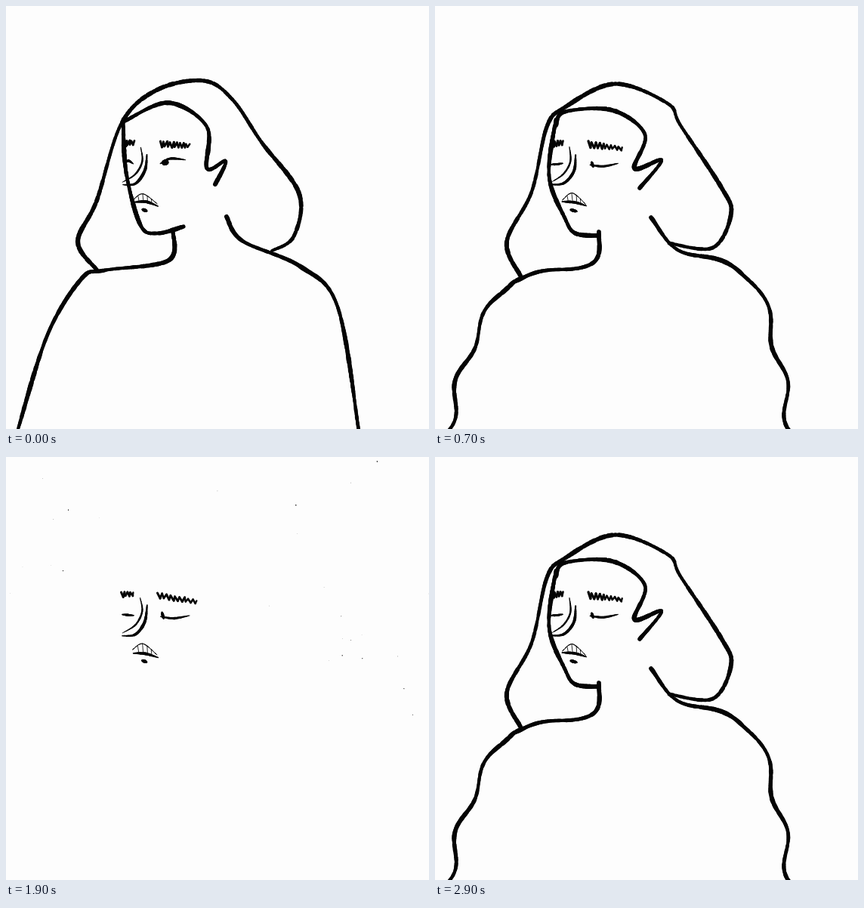
Write an HTML page with a canvas that moves like this. It is 560x560 px and loops after 3.1 s.

```html
<!DOCTYPE html>
<html lang="en">
<head>
<meta charset="utf-8">
<title>Dissolving portrait</title>
<style>
html, body { margin: 0; width: 100%; height: 100%; overflow: hidden; background: #fdfdfd; }
canvas { display: block; }
</style>
</head>
<body>
<canvas id="stage" width="560" height="560"></canvas>
<script>
const ctx = document.getElementById('stage').getContext('2d');
const STEP = 100, LOOP = 3100, LAST = 29, TURN = 18;
const CLOSE = 7, DASHES = 11, DOTS = 13, SCATTER = 15;
const INK = '#050505', PAPER = '#fdfdfd', MIDDLE = 230;

const pts = s => s.split(' ').map(p => p.split(',').map(Number));
const mix = (a, b, k) => a + (b - a) * k;
const mixPt = (p, q, k) => [mix(p[0], q[0], k), mix(p[1], q[1], k)];
const mixPath = (a, b, k) => a.map((p, i) => mixPt(p, b[i], k));
const clamp = v => Math.max(0, Math.min(1, v));
const rnd = n => { const v = Math.sin(n * 127.1 + 11.7) * 43758.5453; return v - Math.floor(v); };
const spread = (n, size) => (rnd(n) * 2 - 1) * size;
const times = (n, make) => Array.from({ length: n }, (_, i) => make(i));

// Catmull-Rom curve through the points, sampled evenly by length.
function curve(p, n = 140) {
  const dense = [], len = [0];
  for (let i = 0; i < p.length - 1; i++) {
    const a = p[Math.max(0, i - 1)], b = p[i], c = p[i + 1], d = p[Math.min(p.length - 1, i + 2)];
    for (let j = i ? 1 : 0; j <= 12; j++) {
      const t = j / 12;
      dense.push([0, 1].map(k => b[k] + t / 2 * (c[k] - a[k] +
        t * (2 * a[k] - 5 * b[k] + 4 * c[k] - d[k] + t * (3 * (b[k] - c[k]) + d[k] - a[k])))));
    }
  }
  for (let i = 1; i < dense.length; i++)
    len.push(len[i - 1] + Math.hypot(dense[i][0] - dense[i - 1][0], dense[i][1] - dense[i - 1][1]));
  const total = len[len.length - 1];
  let j = 0;
  return times(n, i => {
    const s = total * i / (n - 1);
    while (j < dense.length - 2 && len[j + 1] < s) j++;
    return mixPt(dense[j], dense[j + 1], (s - len[j]) / (len[j + 1] - len[j] || 1));
  });
}

function pointAt(path, u) {
  const x = clamp(u) * (path.length - 1), i = Math.min(path.length - 2, Math.floor(x));
  return mixPt(path[i], path[i + 1], x - i);
}
const section = (path, u0, u1, n = 40) => times(n, i => pointAt(path, mix(u0, u1, i / (n - 1))));
const lengthOf = path => path.slice(1).reduce((sum, p, i) => sum + Math.hypot(p[0] - path[i][0], p[1] - path[i][1]), 0);

// Ripples a shoulder line along its normal, stronger towards the hem.
function ripple(path, side) {
  return path.map((p, i) => {
    const a = path[Math.max(0, i - 1)], b = path[Math.min(path.length - 1, i + 1)];
    const dx = b[0] - a[0], dy = b[1] - a[1], u = i / (path.length - 1);
    const push = side * 8 * u * Math.cos((u - .55) / .27 * Math.PI * 2) / Math.hypot(dx, dy);
    return [p[0] + dy * push, p[1] - dx * push];
  });
}

// Each pose: hair, ear with hairline, face, left shoulder, right shoulder.
const pose = (...lines) => lines.map(s => curve(pts(s)));
const first = pose(
  '120,349 95,312 120,258 153,155 200,111 262,99 300,124 338,180 388,248 381,305 352,324',
  '277,236 291,205 266,215 266,160 215,128 156,153',
  '155,150 159,220 178,290 200,301 235,292',
  '221,297 215,337 130,350 100,361 55,435 16,560',
  '292,279 313,311 390,345 439,398 467,562');
const second = pose(
  '118,352 94,325 120,262 160,145 178,130 240,100 308,128 360,203 398,270 370,322 322,322',
  '279,241 297,200 269,215 270,160 205,130 160,158',
  '158,150 158,235 175,287 192,300 231,294',
  '217,299 208,340 120,357 92,374 52,440 15,560',
  '286,280 322,322 405,350 441,410 473,562');
const closed = [...pose(
  '113,357 95,312 128,246 148,160 172,134 238,103 308,129 325,158 379,240 392,275 368,320 310,314',
  '271,241 300,204 264,215 278,170 235,138 172,140 160,158',
  '160,150 151,225 172,281 186,301 217,304'),
  ripple(second[3], -1), ripple(second[4], 1)];

// Where along each line a dash survives; the line breaks halfway between them.
const survivors = [[.05, .26, .4, .59, .71, .82], [.12], [.13, .55], [.05, .5, .66, .88], [.41, .64, .95]];
const outward = ([x, y], k) => [x + (x - MIDDLE) * .12 * k, y - 8 * k];
const pieces = survivors.flatMap((spots, n) => spots.map((spot, i) => {
  const path = closed[n], total = lengthOf(path);
  const u0 = i ? (spots[i - 1] + spot) / 2 : 0;
  const u1 = i < spots.length - 1 ? (spot + spots[i + 1]) / 2 : 1;
  const half = Math.min(25 / total, (u1 - u0) * .2);
  return k => section(path, mix(u0, spot - half, k), mix(u1, spot + half, k)).map(p => outward(p, k));
}));

// A dash crumbles into four dots that drift up and away from the middle.
const crumbs = pieces.flatMap((shape, n) => times(4, i => {
  const u = .05 + .3 * i, seed = n * 4 + i, dash = shape(1), [x, y] = pointAt(dash, u);
  const drift = [Math.sign(x - MIDDLE) * 14 + spread(seed, 4), -8 - y * y / 6000 + spread(seed + 99, 4)];
  return { bit: section(dash, u - .1, u + .1, 6), drift, dot: [x + drift[0], y + drift[1]] };
}));

// Specks fan out in an arc around the head, each leaving from a dot in the same direction.
const angle = p => Math.atan2(p[0] - 250, 340 - p[1]);
const origins = crumbs.map(c => c.dot).sort((a, b) => angle(a) - angle(b));
const specks = times(84, i => {
  const turn = mix(-1.6, 1.85, (i + rnd(i)) / 84), reach = mix(205, 410, rnd(i + 200));
  return {
    from: origins[Math.floor(i * origins.length / 84)],
    to: [250 + Math.sin(turn) * reach, 340 - Math.cos(turn) * reach],
    r: .6 + 1.8 * rnd(i + 400) ** 3
  };
});

function brush(path, width, seed = 0) {
  for (let i = 1; i < path.length; i++) {
    ctx.lineWidth = width(i / (path.length - 1)) * (.88 + .24 * rnd(i + seed));
    ctx.beginPath();
    ctx.moveTo(...path[i - 1]);
    ctx.lineTo(...path[i]);
    ctx.stroke();
  }
}

function speck([x, y], r, seed) {
  ctx.beginPath();
  ctx.ellipse(x, y, r * 1.15, r * .9, rnd(seed) * Math.PI, 0, Math.PI * 2);
  ctx.fill();
}

function scribble(a, b, teeth, seed) {
  const zigzag = times(teeth + 1, i => {
    const [x, y] = mixPt(a, b, i / teeth);
    return [x + spread(i + seed, 1), y + (i % 2 ? 1 : -1) * (4 - 1.6 * i / teeth) * (.6 + .5 * rnd(i + seed))];
  });
  brush(zigzag, u => 3 - .5 * u, seed);
}

const features = [
  ['178,187 180,205 171,223 155,233', 2.4],
  ['187,197 184,218 171,234 154,237', 4],
  ['169,260 185,260 201,265', 3.6],
  ['180,270 187,271', 4.2]
];
const openEyes = [['157,209 162,205 168,209', 3], ['205,209 217,202 238,203', 3], ['209,208 214,207', 7]];
const closedEyes = [['153,209 161,210 169,209', 3], ['205,211 222,213 242,209', 3], ['207,206 209,214', 3.6]];

function drawFace(f) {
  const drift = clamp(f / DOTS);
  const shaky = (s, seed) => curve(pts(s).map(([x, y], i) =>
    [x + spread(seed + i, 1), y + spread(seed + i + 50, 1)]), 24);
  scribble([mix(157, 153, drift), 182], [169, 181], 8, f);
  scribble([mix(204, 201, drift), 183], [mix(243, 253, drift), mix(185, 192, drift)], 18, f);
  [...features, ...(f < CLOSE ? openEyes : closedEyes)].forEach(([s, width], i) =>
    brush(shaky(s, f * 9 + i * 5), u => width * (.4 + .6 * Math.sin(Math.PI * u)), f));
  const upper = shaky('168,256 181,248 200,262', f), lip = shaky('169,260 185,260 201,265', f);
  brush(upper, () => 1);
  for (let i = 5; i < 20; i += 4) brush([upper[i], lip[i]], () => .8);
}

function drawOutline(f) {
  const [a, b, k] = f <= 5 ? [first, second, f / 5] : [second, closed, (f - 5) / 2];
  a.forEach((line, i) => {
    const pressure = u => 5.1 + .7 * Math.sin(u * 17 + i * 2 + f);
    brush(mixPath(line, b[i], k), pressure, f * 7);
  });
}

function drawPieces(k) {
  const taper = u => .25 + .65 * Math.sin(Math.PI * u ** .7);
  pieces.forEach((shape, i) => brush(shape(k), u => 5.2 * mix(1, taper(u), k), i));
}

function drawCrumbs() {
  crumbs.forEach(({ bit, drift }, i) =>
    brush(bit.map(([x, y]) => [x + drift[0] / 2, y + drift[1] / 2]), () => 4, i));
}

function drawSpecks(q) {
  const fade = 1 - clamp((q - 1) / 1.5);
  if (!q) origins.forEach((p, i) => speck(p, 2 + rnd(i), i));
  else if (fade) specks.forEach((s, i) =>
    speck(mixPt(s.from, s.to, q), mix(2.6, s.r, clamp(q)) * fade, i));
}

let shown = -1;
function tick() {
  const step = Math.min(LAST, Math.floor(performance.now() % LOOP / STEP));
  if (step !== shown) {
    shown = step;
    const f = step > TURN ? 2 * TURN - step : step;
    ctx.fillStyle = PAPER;
    ctx.fillRect(0, 0, 560, 560);
    ctx.fillStyle = ctx.strokeStyle = INK;
    ctx.lineCap = ctx.lineJoin = 'round';
    if (f <= CLOSE) drawOutline(f);
    else if (f <= DASHES) drawPieces((f - CLOSE) / (DASHES - CLOSE));
    else if (f < DOTS) drawCrumbs();
    else drawSpecks((f - DOTS) / (SCATTER - DOTS));
    drawFace(f);
  }
  requestAnimationFrame(tick);
}
tick();
</script>
</body>
</html>
```
